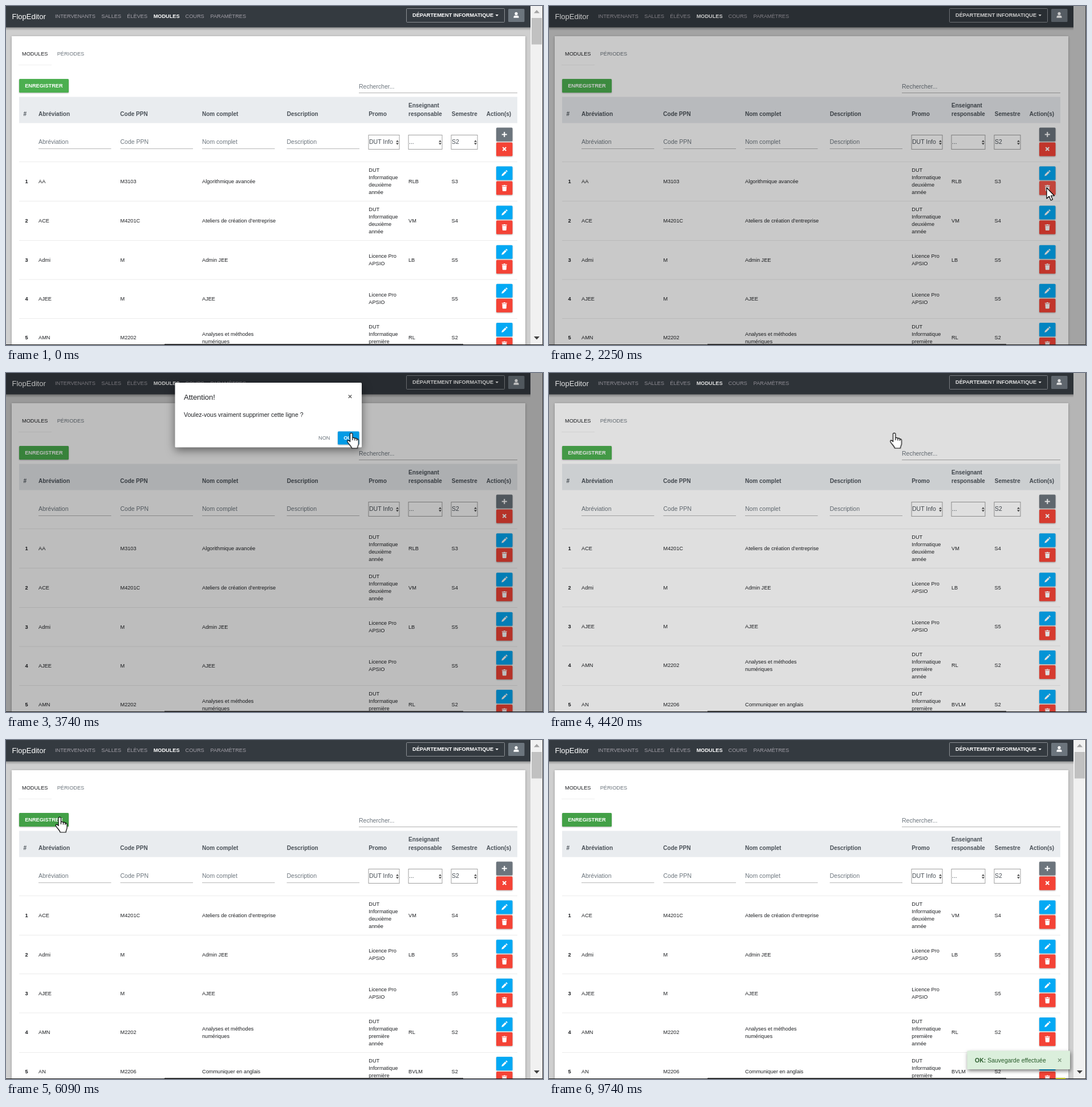
An HTML page for the animation above (9.93 s loop, 942x595 px).

```html
<!DOCTYPE html>
<html lang="fr">
<head>
<meta charset="utf-8">
<title>Modules</title>
<style>
html, body { margin: 0; width: 100%; height: 100%; overflow: hidden; background: #cfcfcf; }
svg { display: block; width: 942px; height: 595px; }
text { font-family: "Liberation Sans", Arial, sans-serif; font-size: 9.2px; fill: #1f2124; white-space: pre; }
.b { font-weight: 700; }
.th { font-size: 10px; font-weight: 700; fill: #495057; }
.in { font-size: 10.5px; fill: #6c757d; }
.sel { fill: #495057; }
.nav { fill: #a3a0a8; }
.w { fill: #fff; }
.big { font-size: 13px; }
.mid { font-size: 10.5px; }
.card { filter: drop-shadow(0 1px 2px rgba(0,0,0,.28)); }
.btn { filter: drop-shadow(0 1px 1px rgba(0,0,0,.3)); }
.deep { filter: drop-shadow(0 5px 8px rgba(0,0,0,.5)); }
.pop { filter: drop-shadow(1px 3px 3px rgba(0,0,0,.5)); }

/* one loop = 9.93 s */
.a { animation: 9.93s linear infinite; }
.step { animation-timing-function: step-end; }
#before { animation-name: before; }
#after { animation-name: after; }
#hot { animation-name: hot; }
#bar { animation-name: bar; }
#shade { animation-name: shade; }
#modal { animation-name: modal; }
#save { animation-name: save; }
#wave { animation-name: wave; }
#toast { animation-name: toast; }
#cursor { animation-name: path; }
#arrow { animation-name: arrow; }
#hand { animation-name: hand; }
#spot { animation-name: spot; }

@keyframes before { 0% { opacity: 1 } 40.68%, 100% { opacity: 0 } }
@keyframes after { 0% { opacity: 0 } 40.68%, 100% { opacity: 1 } }
@keyframes hot { 0% { opacity: 0 } 10.5% { opacity: 1 } 24%, 100% { opacity: 0 } }
@keyframes bar { 0% { opacity: 1 } 20.34% { opacity: 0 } 45.5%, 100% { opacity: 1 } }
@keyframes shade {
  0%, 20.04% { opacity: 0 } 23.26%, 43.7% { opacity: .26 } 45.3%, 100% { opacity: 0 }
}
@keyframes modal {
  0%, 23.5% { opacity: 0; transform: translateY(-28px); animation-timing-function: ease-out }
  26.5%, 40.4% { opacity: 1; transform: none; animation-timing-function: ease-out }
  42.6%, 100% { opacity: 0; transform: translateY(-24px) }
}
@keyframes save { 0%, 55.5% { fill: #4caf50 } 57%, 100% { fill: #43a047 } }
@keyframes wave {
  0%, 63.4% { opacity: 0; r: 2px } 64% { opacity: .2; r: 10px }
  65.36% { opacity: .15; r: 60px } 66.87%, 100% { opacity: 0; r: 60px }
}
@keyframes toast { 0%, 63.5% { opacity: 0 } 65.1%, 100% { opacity: 1 } }
@keyframes path {
  0%, 2.92% { transform: translate(709px, 507px) }
  6.5% { transform: translate(800px, 400px) }
  9.6% { transform: translate(866px, 312px) }
  12.39%, 13.1% { transform: translate(868px, 325px) }
  15.5%, 24.5% { transform: translate(873px, 319px) }
  27% { transform: translate(740px, 235px) }
  29.91%, 32.4% { transform: translate(590px, 150px) }
  34.54%, 45.6% { transform: translate(605.5px, 105px) }
  48.74%, 50.6% { transform: translate(300px, 146px) }
  54% { transform: translate(180px, 130px) }
  57.5%, 60.8% { transform: translate(98px, 142px) }
  61.33% { transform: translate(94px, 135px) }
  62.24%, 63.2% { transform: translate(98px, 130px) }
  65.36%, 68.5% { transform: translate(98px, 142px) }
  71.5%, 74% { transform: translate(508px, 397px) }
  76.03%, 78.8% { transform: translate(803px, 583px) }
  80.5% { transform: translate(750px, 542px) }
  83.2% { transform: translate(850px, 562px) }
  85.6%, 100% { transform: translate(890px, 600px) }
}
@keyframes arrow {
  0% { opacity: 0 } 2.92% { opacity: 1 } 9.6% { opacity: 0 } 20.34% { opacity: 1 }
  33.6% { opacity: 0 } 45.8% { opacity: 1 } 56.8% { opacity: 0 } 69.18% { opacity: 1 }
  85.6%, 100% { opacity: 0 }
}
@keyframes hand {
  0% { opacity: 0 } 9.6% { opacity: 1 } 20.34% { opacity: 0 } 33.6% { opacity: 1 }
  45.8% { opacity: 0 } 56.8% { opacity: 1 } 69.18%, 100% { opacity: 0 }
}
@keyframes spot { 0% { opacity: 0 } 98.09%, 100% { opacity: 1 } }
</style>
</head>
<body>
<svg id="stage" viewBox="0 0 942 595" xmlns="http://www.w3.org/2000/svg"></svg>
<script>
const text = (x, y, s, cls = '') => `<text x="${x}" y="${y}" class="${cls}">${s}</text>`;
const rect = (x, y, w, h, fill, more = '') =>
  `<rect x="${x}" y="${y}" width="${w}" height="${h}" fill="${fill}" ${more}/>`;
const path = (d, fill, more = '') => `<path d="${d}" fill="${fill}" ${more}/>`;
const group = (attrs, ...parts) => `<g ${attrs}>${parts.join('')}</g>`;
const at = (x, y, s) => group(`transform="translate(${x} ${y})"`, s);
const cross = (x, y, r, color, w) =>
  path(`M${x - r} ${y - r}l${2 * r} ${2 * r}M${x + r} ${y - r}l${-2 * r} ${2 * r}`, 'none', `stroke="${color}" stroke-width="${w}"`);

const pencil = path('M-5 5L-4.3 2 1.3-3.6 3.6-1.3-2 4.3ZM2-4.3L3-5.2Q3.6-5.6 4.2-5L5-4.2Q5.6-3.6 5.2-3L4.3-2Z', '#fff');
const trash = path('M-4.5-4.8H-1.6L-1-5.6H1L1.6-4.8H4.5V-3.5H-4.5ZM-3.9-2.8H3.9L3.4 4.6Q3.3 5.5 2.5 5.5H-2.5Q-3.3 5.5-3.4 4.6Z', '#fff');

const button = (x, y, w, h, fill, more = '') => rect(x, y, w, h, fill, `rx="1.5" class="btn" ${more}`);
const iconButton = (y, fill, icon) => button(860, y, 28.5, 24, fill) + at(874.3, y + 12, icon);

// lines of one cell, centred around y
const cell = (x, y, s) => s.split('|').map((line, i, all) =>
  text(x, y + 3.2 + (i - (all.length - 1) / 2) * 13.1, line)).join('');

const second = 'DUT|Informatique|deuxième|année';
const first = 'DUT|Informatique|première|année';
const pro = 'Licence Pro|APSIO';
const modules = [
  ['AA', 'M3103', 'Algorithmique avancée', second, 'RLB', 'S3'],
  ['ACE', 'M4201C', 'Ateliers de création d’entreprise', second, 'VM', 'S4'],
  ['Admi', 'M', 'Admin JEE', pro, 'LB', 'S5'],
  ['AJEE', 'M', 'AJEE', pro, '', 'S5'],
  ['AMN', 'M2202', 'Analyses et méthodes|numériques', first, 'RL', 'S2'],
  ['AN', 'M2206', 'Communiquer en anglais', first, 'BVLM', 'S2'],
];
const columns = [57, 200.5, 344, 636.3, 706, 781.5];

const row = (data, i, y) =>
  text(33.5, y + 3.2, i + 1, 'b') +
  data.map((s, k) => cell(columns[k], y, s)).join('') +
  iconButton(y - 26, '#03a9f4', pencil) + iconButton(y, '#f44336', trash);

const table = (id, skip, centres, lines) => group(`id="${id}" class="a step"`,
  ...lines.map(y => rect(23, y, 874, 1, '#ebebeb')),
  ...centres.map((y, i) => row(modules[i + skip], i, y)));

const select = (x, w, s) =>
  rect(x + .5, 226.5, w, 25, '#fff', 'stroke="#a0a0a0"') + text(x + 1.5, 242.4, s, 'in sel') +
  path(`M${x + w - 5.5} 238.4h5l-2.5-3zM${x + w - 5.5} 240.4h5l-2.5 3z`, '#444');

const field = (x, s) => text(x, 242.4, s, 'in') + rect(x, 250, 127.5, 1, '#b8b8b8');

const navbar = rect(0, 37, 920, 6, 'url(#fall)') + rect(0, 0, 920, 37.5, '#343a40') +
  text(10.5, 22.7, 'FlopEditor', 'w big') +
  [[86, 'INTERVENANTS'], [167.3, 'SALLES'], [212.3, 'ÉLÈVES'], [314.5, 'COURS'], [358.5, 'PARAMÈTRES']]
    .map(([x, s]) => text(x, 20.8, s, 'nav')).join('') +
  text(258.7, 20.8, 'MODULES', 'w b') +
  rect(702.5, 4.5, 172, 24, 'none', 'stroke="#8b8f94" rx="1"') +
  text(713, 19.2, 'DÉPARTEMENT INFORMATIQUE', 'w b') +
  path('M858.5 15h5.4l-2.7 3z', '#fff') +
  rect(881, 5, 28.5, 23, '#6c757d', 'rx="1.5"') +
  '<circle cx="895" cy="13.4" r="2.6" fill="#fff"/>' +
  path('M890.5 20.8V19.5Q890.5 16.8 893 16.8H897Q899.5 16.8 899.5 19.5V20.8Z', '#fff');

const card = rect(10, 53, 901, 560, '#fff', 'class="card"') +
  text(28, 86.7, 'MODULES') + text(89.7, 86.7, 'PÉRIODES', 'in" style="font-size:9.2px') +
  rect(22, 103, 58, 1, '#efefef') +
  button(23, 128, 87, 24, '#4caf50', 'id="save" style="animation:save 9.93s linear infinite"') +
  group('clip-path="url(#face)"', '<circle id="wave" class="a" cx="92" cy="138" r="2" fill="#fff"/>') +
  text(33.2, 142.8, 'ENREGISTRER', 'w b') +
  text(619, 144.6, 'Rechercher...', 'in') + rect(619, 152, 278, 1, '#b0b0b0') +
  rect(23, 159.5, 874, 46, '#e9ecef') +
  [[30.5, '#'], [57, 'Abréviation'], [200.3, 'Code PPN'], [344, 'Nom complet'], [492.7, 'Description'],
    [636.2, 'Promo'], [706, 'responsable'], [781.8, 'Semestre'], [842.8, 'Action(s)']]
    .map(([x, s]) => text(x, 192.5, s, 'th')).join('') +
  text(706, 177.6, 'Enseignant', 'th') +
  field(57, 'Abréviation') + field(200.5, 'Code PPN') + field(344, 'Nom complet') + field(492.5, 'Description') +
  select(635.5, 54, 'DUT Info') + select(705.5, 59, '...') + select(780.5, 46, 'S2') +
  iconButton(213.5, '#6c757d', path('M-4.5 0H4.5M0-4.5V4.5', 'none', 'stroke="#fff" stroke-width="2"')) +
  iconButton(239.5, '#f44336', cross(0, -.5, 3, '#fff', 2)) +
  rect(23, 273, 874, 1, '#ebebeb');

const rows = table('before', 0, [307.5, 376.5, 445.7, 513.7, 582], [342, 411, 479.5, 548]) +
  table('after', 1, [307.5, 376.5, 444.7, 513, 582], [342, 410, 478.5, 548]) +
  group('id="hot" class="a step"', rect(860, 307.5, 28.5, 24, '#f6574b', 'rx="1.5"') + at(874.3, 319.5, trash));

const scrollbar = group('id="bar" class="a step"',
  rect(920, 0, 22, 595, '#f1f1f1'), rect(922, 21, 18, 46.5, '#c1c1c1'),
  path('M926 12.5h10l-5-5.5z', '#a3a3a3'), path('M926 580h10l-5 5.5z', '#404040'));

const modal = group('id="modal" class="a"',
  rect(296.5, 17, 327.5, 113.5, '#fff', 'rx="1.5" class="deep"'),
  text(312, 47, 'Attention!', 'big'),
  cross(603.5, 41.2, 2.7, '#6a6a6a', 1.5),
  text(312, 77, 'Voulez-vous vraiment supprimer cette ligne ?', 'mid'),
  text(548, 117, 'NON', 'in" style="font-size:9.2px'),
  button(582, 102.5, 37.5, 23, '#039be5'),
  text(592.2, 117, 'OUI', 'w b'));

const toast = group('id="toast" class="a"',
  rect(733.5, 545.5, 180.5, 32.5, '#dbefdc', 'rx="1" class="pop"'),
  `<text x="747" y="565.5" class="mid" style="fill:#285b2a"><tspan class="b">OK:</tspan> Sauvegarde effectuée</text>`,
  cross(895.8, 562, 2.7, '#7f9a80', 1.5));

const frame = rect(0, 594, 942, 1, '#1a1a1a') + rect(278, 593, 524, 1, '#4a4a4a') + rect(941, 0, 1, 595, '#3a3a3a') +
  group('id="spot" class="a step"', rect(889, 593, 17, 2, '#b9bd1e'));

const cursor = group('id="cursor" class="a" stroke="#000" stroke-width="1.2" stroke-linejoin="round"',
  path('M0 0V19L4.4 15 7.3 22 10.5 20.7 7.5 14H13.5Z', '#fff', 'id="arrow" class="a step"'),
  path('M-2 2.4C-2-.3 2.4-.3 2.4 2.4V9.5C3 7.8 6 8 6.4 10.2 7.2 8.8 9.6 9.2 9.9 11.4 11 10.4 13 11 13 13.6V19C13 22 11 23 11 27H1C.5 24-3 21-5.5 17.5-8 14.5-6 12.2-4 13.5L-2 15.5ZM2.4 9.5V13M6.4 10.2V13.5M9.9 11.4V14', '#fff', 'id="hand" class="a step"'));

document.getElementById('stage').innerHTML =
  `<defs><linearGradient id="fall" x2="0" y2="1"><stop stop-opacity=".3"/><stop offset="1" stop-opacity="0"/></linearGradient>
   <clipPath id="face">${rect(23, 128, 87, 24, '#000')}</clipPath></defs>` +
  rect(0, 0, 942, 595, '#cfcfcf') + card + navbar + rows +
  rect(0, 0, 942, 595, '#000', 'id="shade" class="a"') +
  scrollbar + modal + toast + cursor + frame;
</script>
</body>
</html>
```
